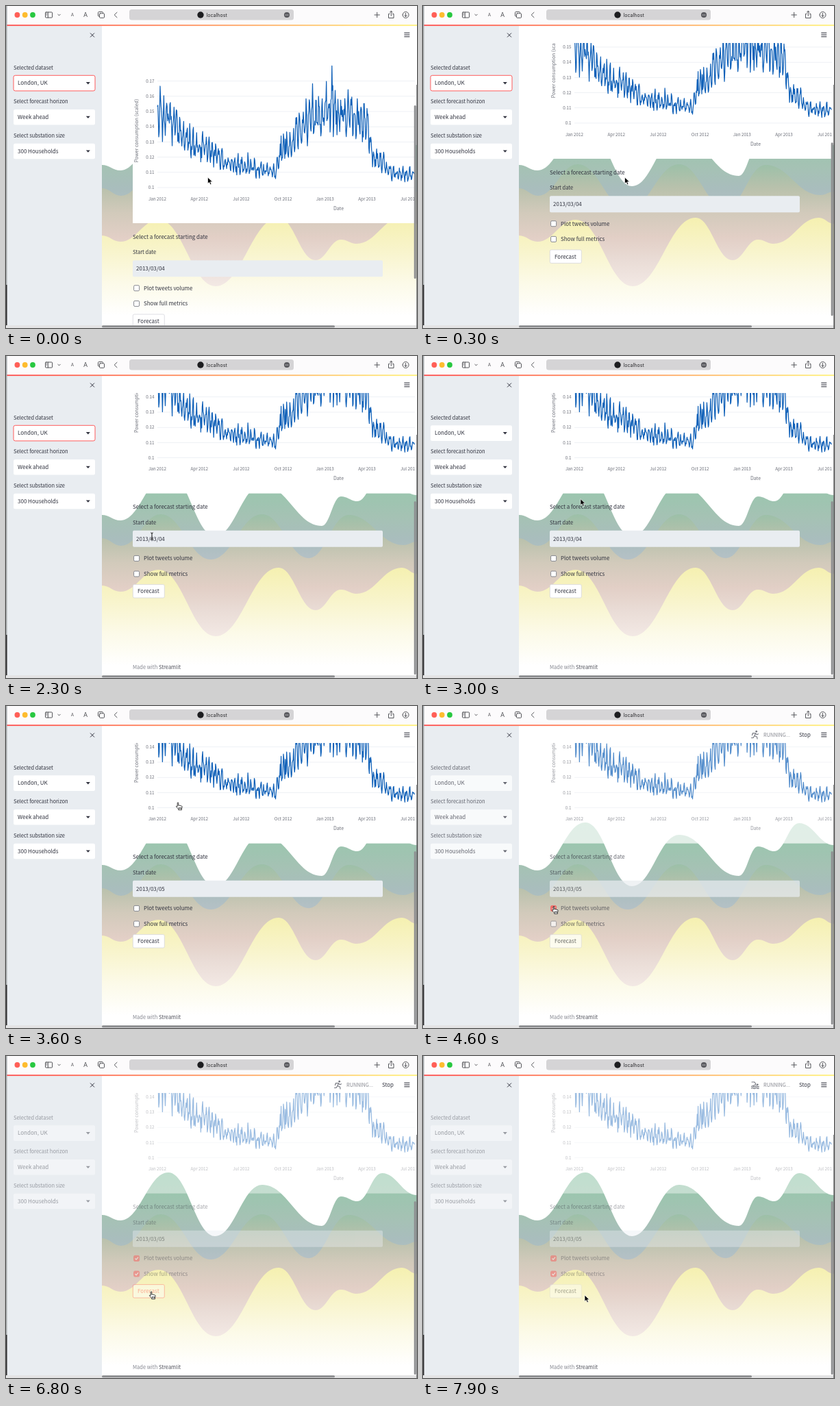
Write an HTML page that moves like this. It is 600 px wide and 470 px high and loops after 8 s.

```html
<!DOCTYPE html>
<html lang="en">
<head>
<meta charset="utf-8">
<title>Forecast dashboard</title>
<style>
  html, body { margin: 0; width: 100%; height: 100%; overflow: hidden; background: #fff; }
  svg { display: block; width: 600px; height: 470px; }
  text { font-family: "Noto Sans CJK JP", "Noto Sans CJK SC", "Noto Sans CJK", "Open Sans", sans-serif; white-space: pre; }
  .ui { font-family: Inter, Roboto, sans-serif; }
  .line { fill: none; stroke: #55565a; stroke-width: 1; stroke-linecap: round; stroke-linejoin: round; }
</style>
</head>
<body>
<svg id="stage" viewBox="0 0 600 470" xmlns="http://www.w3.org/2000/svg"></svg>
<script>
const LOOP = 8000;
const INK = '#31333f', RED = '#ff4b4b', PANEL = '#e9edf1', GREY = '#6b6e78', EDGE = '#d6d7dc';

// ---------- helpers ----------
const text = (s, x, cy, size = 8, fill = INK, extra = '') =>
  `<text x="${x}" y="${cy + size * 0.36}" font-size="${size}" fill="${fill}" ${extra}>${s}</text>`;
const rect = (x, y, w, h, fill, extra = '') =>
  `<rect x="${x}" y="${y}" width="${w}" height="${h}" fill="${fill}" ${extra}/>`;
const dot = (x, y, r, fill) => `<circle cx="${x}" cy="${y}" r="${r}" fill="${fill}"/>`;
const line = (d, extra = '') => `<path class="line" d="${d}" ${extra}/>`;
const gradient = (id, y1, y2, colors) =>
  `<linearGradient id="${id}" gradientUnits="userSpaceOnUse" x1="0" x2="0" y1="${y1}" y2="${y2}">` +
  colors.map((c, i) => `<stop offset="${i / (colors.length - 1)}" stop-color="${c}"/>`).join('') + '</linearGradient>';

const clamp = u => Math.min(1, Math.max(0, u));
const smooth = u => u * u * (3 - 2 * u);
const easeOut = u => 1 - (1 - u) ** 3;

// Value of a column at position p in rows sorted by their first entry
function at(keys, p, col = 1) {
  const i = Math.max(1, keys.findIndex(k => k[0] > p));
  const a = keys[i - 1], b = keys[i];
  return a[col] + (b[col] - a[col]) * smooth(clamp((p - a[0]) / (b[0] - a[0])));
}

// ---------- background: each wave runs level through its crests and troughs ----------
function wave(turns, fill) {
  let d = `M${turns[0]}`;
  for (let i = 1; i < turns.length; i++) {
    const [x0, y0] = turns[i - 1], [x1, y1] = turns[i], pull = (x1 - x0) * 0.42;
    d += `C${x0 + pull},${y0} ${x1 - pull},${y1} ${x1},${y1}`;
  }
  return `<path d="${d}V470H140Z" fill="${fill}"/>`;
}

const waves = () =>
  wave([[140, 232], [167, 240], [237, 170], [305, 263], [374, 188], [461, 248], [489, 205], [513, 212], [549, 171], [600, 203]], 'url(#gGreen)') +
  wave([[140, 266], [168, 277], [226, 231], [299, 297], [374, 231], [442, 295], [500, 232], [580, 276], [600, 271]], 'url(#gOlive)') +
  wave([[140, 335], [167, 344], [223, 312], [306, 409], [398, 309], [452, 371], [489, 341], [512, 347], [578, 309], [600, 318]], 'url(#gYellow)');

const defs = `<defs>
  ${gradient('gGreen', 170, 300, ['#92c7aa', '#9cc5af', '#a5c2b4', '#a9bdbd', '#b6c1c7'])}
  ${gradient('gOlive', 230, 410, ['#9bc0a8', '#b9c1ac', '#d2cabb', '#e2cfc6', '#eaddd7', '#f3e9e5'])}
  ${gradient('gYellow', 308, 452, ['#f5f0b0', '#f8f4cb', '#fcfae8', '#ffffff'])}
  <linearGradient id="gBar"><stop stop-color="#ff4b4b"/><stop offset=".5" stop-color="#ff9a62"/><stop offset="1" stop-color="#fff27c"/></linearGradient>
  <clipPath id="main"><rect x="140" y="54" width="457" height="412"/></clipPath>
</defs>`;

// ---------- chart ----------
// Seasonal level; the daily swing grows with consumption
const season = [[221, 160], [290, 207], [330, 231], [392, 241], [404, 210], [440, 169], [480, 153], [526, 170], [538, 222], [570, 245], [597, 244]];

function seriesPath() {
  const step = 0.674, points = [];
  let seed = 71;
  const rnd = () => (seed = seed * 16807 % 2147483647) / 2147483647;
  for (let x = 221, day = 0; x < 596.5; x += step, day++) {
    const mid = at(season, x), swing = 11 + (242 - mid) * 0.27;
    const week = Math.cos(day * 2 * Math.PI / 7), spike = rnd() > 0.975 ? 1 : 0;
    points.push(`${x.toFixed(1)},${(mid - swing * (week * 0.6 + rnd() * 1.3 - 0.65 + spike)).toFixed(1)}`);
  }
  return 'M' + points.join('L');
}

function chart() {
  let s = rect(185, 54, 415, 263, '#fff');
  for (let i = 0; i < 8; i++) {
    const y = 265 - i * 22.2;
    s += rect(221, y - 0.3, 376, 0.6, '#e3e7ee');
    s += text(i ? '0.1' + i : '0.1', 216.5, y, 6.3, GREY, 'text-anchor="end"');
  }
  const months = ['Jan', 'Apr', 'Jul', 'Oct'];
  for (let i = 0; i < 7; i++)
    s += text(`${months[i % 4]} ${i < 4 ? 2012 : 2013}`, 221 + i * 61.2, 281.5, 6.3, GREY, 'text-anchor="middle"');
  s += text('Date', 485.5, 295.3, 7, GREY, 'text-anchor="middle"');
  s += text('Power consumption (scaled)', 0, 0, 7, GREY, 'text-anchor="middle" transform="translate(190.5 182) rotate(-90)"');
  return s + `<path d="${seriesPath()}" fill="none" stroke="#0f60b8" stroke-width="1.25" stroke-linejoin="round"/>`;
}

// ---------- page parts ----------
const checkbox = (id, y, label) =>
  rect(186.6, y - 4, 8, 8, '#fff', `id="${id}" rx="1.5"`) +
  `<path id="${id}Tick" d="M188.4 ${y}l1.7 1.8l3-3.6" fill="none" stroke="#fff" stroke-width="1.2"/>` +
  text(label, 201, y);

const form = () =>
  text('Select a forecast starting date', 185, 337) +
  text('Start date', 185, 359.5, 7.5) +
  rect(185, 371.2, 365, 24, PANEL, 'rx="2"') +
  text('2013/03/04', 190, 383.3, 8, INK, 'id="date"') +
  checkbox('tweets', 411.8, 'Plot tweets volume') +
  checkbox('metrics', 434.4, 'Show full metrics') +
  rect(185.3, 450, 46, 19.4, '#fff', 'id="button" rx="2" stroke-width="0.8"') +
  text('Forecast', 192, 459.7, 8, INK, 'id="buttonText"');

const footer = () =>
  text('Made with <tspan fill="#50525b">Streamlit</tspan>', 185, 571, 7.5, '#85878f');

const select = (label, value, y) =>
  text(label, 11, y - 22.7, 7.5) +
  rect(11, y - 11.3, 119, 22.6, '#fff', 'rx="2.5"') +
  text(value, 17, y) +
  `<path d="M116.8 ${y - 1.5}h6l-3 3.3z" fill="${INK}"/>`;

const sidebar = () => rect(2, 29, 138, 437, PANEL) +
  '<g id="side">' + select('Selected dataset', 'London, UK', 112.6) +
  rect(11, 101.3, 119, 22.6, 'none', `id="focus" rx="2.5" stroke="${RED}" stroke-width="0.9"`) +
  rect(62.3, 107.5, 0.7, 10, INK, 'id="caret"') +
  select('Select forecast horizon', 'Week ahead', 162.3) +
  select('Select substation size', '300 Households', 212) + '</g>' +
  line('M123.3 39.8l5.4 5.4m0-5.4l-5.4 5.4', `style="stroke:${INK}"`);

const toolbar = () => rect(0, 0, 600, 28, '#fcfbfc') +
  ['#ff5f57', '#febc2e', '#28c840'].map((c, i) => dot(16.4 + i * 11.3, 13, 3.9, c)).join('') +
  line('M58.5 9h8a1 1 0 0 1 1 1v6a1 1 0 0 1-1 1h-8a1 1 0 0 1-1-1v-6a1 1 0 0 1 1-1zM61.3 9v8M59 11h.8M59 13h.8') +
  line('M75.8 12.2l1.7 1.7l1.7-1.7') +
  text('A', 97, 13.2, 6.3, '#55565a', 'class="ui" text-anchor="middle"') +
  text('A', 116, 13, 9, '#55565a', 'class="ui" text-anchor="middle"') +
  line('M136.5 15h-1a1 1 0 0 1-1-1v-4.5a1 1 0 0 1 1-1h5a1 1 0 0 1 1 1v1M137.5 10.8h5a1 1 0 0 1 1 1v4.5a1 1 0 0 1-1 1h-5a1 1 0 0 1-1-1v-4.5a1 1 0 0 1 1-1z') +
  line('M162 9.3l-3.8 3.7l3.8 3.7') +
  rect(180, 5, 240, 15.6, '#d5d4d6', 'rx="3.5"') +
  dot(284, 13, 4.7, '#1d1d20') +
  text('localhost', 292.5, 13, 7.1, '#29292c', 'class="ui"') +
  dot(410, 13, 4.1, '#5b5b60') + [-1.8, 0, 1.8].map(x => dot(410 + x, 13, 0.6, '#fff')).join('') +
  line('M538 13h7.4M541.7 9.3v7.4') +
  line('M560 11.5h-1.5v6h7.5v-6h-1.5M562.3 14.5v-7M560.3 9.3l2-2l2 2') +
  line('M579 13a4.5 4.5 0 1 0 9 0a4.5 4.5 0 1 0-9 0M583.5 10.5v5M581.6 13.7l1.9 1.9l1.9-1.9');

const poses = [
  'M485.5 40l-2.5 3.5l3 2l-.5 3M483.5 43l-1.5 2.5h-2.5M481 41.5l1.5-2.3l3 .5l1.5 2l2 .3',
  'M485.5 39.8l-1.5 4l3.5 1.2l.5 3M484 43.5l-2 2.8l-2.5.2M480.5 42.5l1-3l4 .3l2 2l2-1',
  'M480 38h4l2 3.5l-4 2M479.5 44.5q1.5-1.2 2.8 0t2.8 0t2.8 0t2.3 0M479.5 47q1.5-1.2 2.8 0t2.8 0t2.8 0t2.3 0'];

const status = () => '<g id="status">' + poses.map((d, i) =>
  `<g id="pose${i}">` + line(d, 'style="stroke:#777982;stroke-width:1.2"') +
  dot(i < 2 ? 486.7 : 488.3, i < 2 ? 37.2 : 41.8, 1.4, '#777982') + '</g>').join('') +
  text('RUNNING...', 497, 42, 7.3, '#85878f') + text('Stop', 549, 42.3, 7.8) + '</g>';

const frame = () => rect(0, 0, 1.6, 407, '#a3a7aa') + rect(0, 407, 1.6, 63, '#2b2c2e') +
  rect(0, 466, 600, 4, '#e4e4e5') + rect(140, 466.2, 340, 3, '#8b8c8e', 'rx="1.5"') +
  rect(595.7, 145, 3, 253, '#8f9092', 'id="thumb" rx="1.5"') + rect(599.2, 115, 0.8, 355, '#6a6b6d');

const cursors = `
  <path id="arrow" d="M0 0v9.3l2.2-2l1.5 3.5l1.7-.7l-1.5-3.400h3z" fill="#000" stroke="#fff" stroke-width=".7"/>
  <path id="beam" d="M-1.7-5q1.7 0 1.7 1.2q0-1.2 1.7-1.2M0-4v8M-1.7 5q1.7 0 1.7-1.2q0 1.2 1.7 1.2" fill="none" stroke="#111"/>
  <path id="hand" d="M-.8.8q.8-1.2 1.6 0v4l1.3-.5l.5.7l1.3-.3l.5.8h1.2q.6.5.5 1.5l-.6 2.7v1.5h-4.8l-.3-1.5l-3-3.5q.2-1.3 1.8-.2zM1.5 7.5v2.3M3 7.5v2.3M4.4 7.5v2.3" fill="#fff" stroke="#111" stroke-width=".8" stroke-linejoin="round"/>`;

document.getElementById('stage').innerHTML = defs + rect(0, 0, 600, 470, '#fff') + waves() +
  `<g clip-path="url(#main)"><g id="page"><g id="stale">${chart()}${form()}</g>${footer()}</g></g>` +
  sidebar() + rect(140, 29, 460, 25, '#fff') + toolbar() + rect(0, 27.3, 600, 1.8, 'url(#gBar)') +
  [39.2, 42, 44.8].map(y => rect(581.3, y - 0.55, 8, 1.1, '#3c3e49')).join('') +
  status() + frame() + `<g id="cursor">${cursors}</g>`;

// ---------- motion ----------
const SCROLL = 116.4;
const path = [[0, 294.5, 250], [1800, 294.5, 250], [2250, 213, 263], [2700, 213, 263], [3350, 251, 140.5],
  [3700, 251, 140.5], [4300, 191, 292], [4700, 191, 292], [5100, 193, 318], [5500, 193, 318],
  [6200, 212, 343.5], [7000, 212, 343.5], [7500, 236, 349], [LOOP, 236, 349]];

// Areas that change the pointer: id, left, top, right, bottom, pointer
const zones = [['day', 240, 130, 262, 152, 'hand'], ['input', 185, 255, 550, 279, 'beam'],
  ['checks', 185, 290, 273, 323, 'hand'], ['button', 185, 333, 231, 353, 'hand']];

const el = id => document.getElementById(id);
const set = (id, name, value) => el(id).setAttribute(name, value);
const show = (id, on) => set(id, 'visibility', on ? 'inherit' : 'hidden');

function render(t) {
  // Flick with a slight overrun that settles back
  const scroll = (SCROLL + 0.7) * easeOut(clamp((t - 50) / 600)) - 0.7 * smooth(clamp((t - 900) / 600));
  set('page', 'transform', `translate(0 ${-scroll})`);
  set('thumb', 'y', 145 + 67 * clamp(scroll / SCROLL));

  // Outdated parts ease in to a pale state while the app runs
  const fade = clamp((t - 3900) / 1000) ** 2;
  set('stale', 'opacity', 1 - 0.58 * fade);
  set('side', 'opacity', 1 - 0.56 * fade);

  show('focus', t < 2800);
  show('caret', t < 2700 && t % 1000 >= 500);
  el('date').textContent = t < 3500 ? '2013/03/04' : '2013/03/05';

  for (const [id, when] of [['tweets', 4450], ['metrics', 5200]]) {
    const on = t >= when;
    set(id, 'fill', on ? RED : '#fff');
    set(id, 'stroke', on ? RED : '#85878f');
    show(id + 'Tick', on);
  }

  const x = at(path, t), y = at(path, t, 2);
  const zone = zones.find(([, l, top, r, b]) => x >= l && x <= r && y >= top && y <= b) || [];
  const hover = zone[0] === 'button', shape = zone[5] || 'arrow';
  set('cursor', 'transform', `translate(${x} ${y})`);
  for (const id of ['arrow', 'beam', 'hand']) show(id, id === shape);
  set('button', 'stroke', hover ? RED : EDGE);
  set('buttonText', 'fill', hover ? RED : INK);

  show('status', t >= 3900);
  const pose = t >= 7300 ? 2 : Math.floor(t / 100) % 2 ? 0 : 1;
  poses.forEach((_, i) => show('pose' + i, i === pose));
}

const start = performance.now();
function tick() {
  render((performance.now() - start) % LOOP);
  requestAnimationFrame(tick);
}
tick();
</script>
</body>
</html>
```
